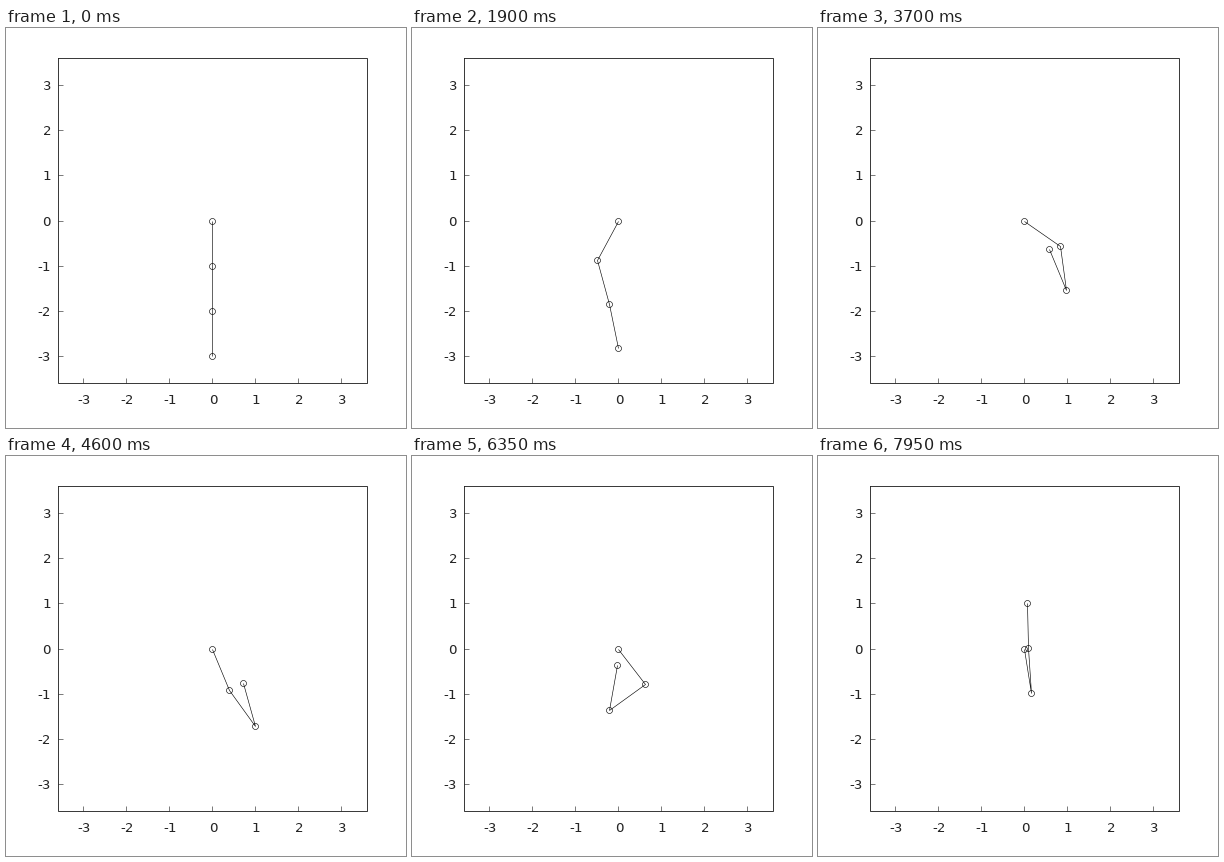
A matplotlib script that plays this animation: 400x400 px, repeating every 8000 ms.

```python
import numpy as np
import matplotlib.pyplot as plt
from matplotlib.animation import FuncAnimation
from matplotlib.patches import Circle

SIZE, STEP, FRAMES = 400, 50, 160
PX = 0.72  # points per pixel at 100 dpi
INK = "#262626"
X0, Y0, SX, SY = 206.8, 193.2, 43.05, 45.25

# Each link's angle from straight down is a sum of eased swings:
# (start ms, end ms, change in degrees).
SWINGS = [
    [(850, 1850, -29.6), (1850, 3000, 97.6), (3000, 5500, -63.2),
     (5950, 6700, 60.2), (6700, 8250, -61)],
    [(1350, 2150, 21), (2150, 2950, -38), (2900, 4600, 54.3),
     (4700, 5900, -27.3), (5900, 6700, -110), (6700, 8120, -78.5)],
    [(1400, 1960, 11.3), (1950, 2900, -70), (2600, 3850, -101),
     (4000, 6000, -20), (6000, 6700, -20), (6600, 7400, 21)],
]


def ease(u):
    return 0.5 - 0.5 * np.cos(np.pi * np.clip(u, 0, 1))


def angle(swings, t):
    return np.radians(sum(d * ease((t - a) / (b - a)) for a, b, d in swings))


def joints(t):
    a = np.array([angle(s, t) for s in SWINGS])
    x = np.concatenate(([0], np.cumsum(np.sin(a))))
    y = np.concatenate(([0], np.cumsum(np.cos(a))))
    return X0 + SX * x, Y0 + SY * y


def snap(v):
    """Centre of the pixel that holds v."""
    return np.floor(v) + 0.5


plt.rcParams["font.family"] = "DejaVu Sans"
plt.rcParams["text.hinting"] = "native"
fig = plt.figure(figsize=(SIZE / 100, SIZE / 100), dpi=100, facecolor="white")
ax = fig.add_axes([0, 0, 1, 1])
ax.set_xlim(0, SIZE)
ax.set_ylim(SIZE, 0)
ax.axis("off")


def stroke(xs, ys, width, color=INK):
    return ax.plot(xs, ys, color=color, lw=width * PX, snap=False,
                   solid_capstyle="butt", solid_joinstyle="miter")[0]


def label(x, y, value, align):
    ax.text(x, y, str(value), color=INK, fontsize=13.33 * PX,
            ha=align, va="baseline")


left, right, top, bottom = 52.5, 361.5, 30.5, 355.5
stroke([left, right, right, left, left],
       [top, top, bottom, bottom, top - 0.5], 0.9)
for k in range(-3, 4):
    x, y = snap(X0 + SX * k), snap(Y0 - SY * k)
    stroke([x, x], [bottom, bottom - 5], 0.6)
    stroke([left, left + 5], [y, y], 0.6)
    label(x + 0.7, 376, k, "center")
    label(45, y + 4.5, k, "right")

chain = stroke([], [], 0.6, "black")
rings = [ax.add_patch(Circle((0, 0), 3, fill=False, ec="black",
                             lw=0.6 * PX, snap=False))
         for _ in range(4)]


def draw(n):
    xs, ys = joints(n * STEP)
    xs, ys = snap(xs), snap(ys)
    chain.set_data(xs, ys)
    for ring, x, y in zip(rings, xs, ys):
        ring.center = x, y
    return chain, *rings


anim = FuncAnimation(fig, draw, frames=FRAMES, interval=STEP,
                     repeat=True, repeat_delay=0)
plt.show()
```
